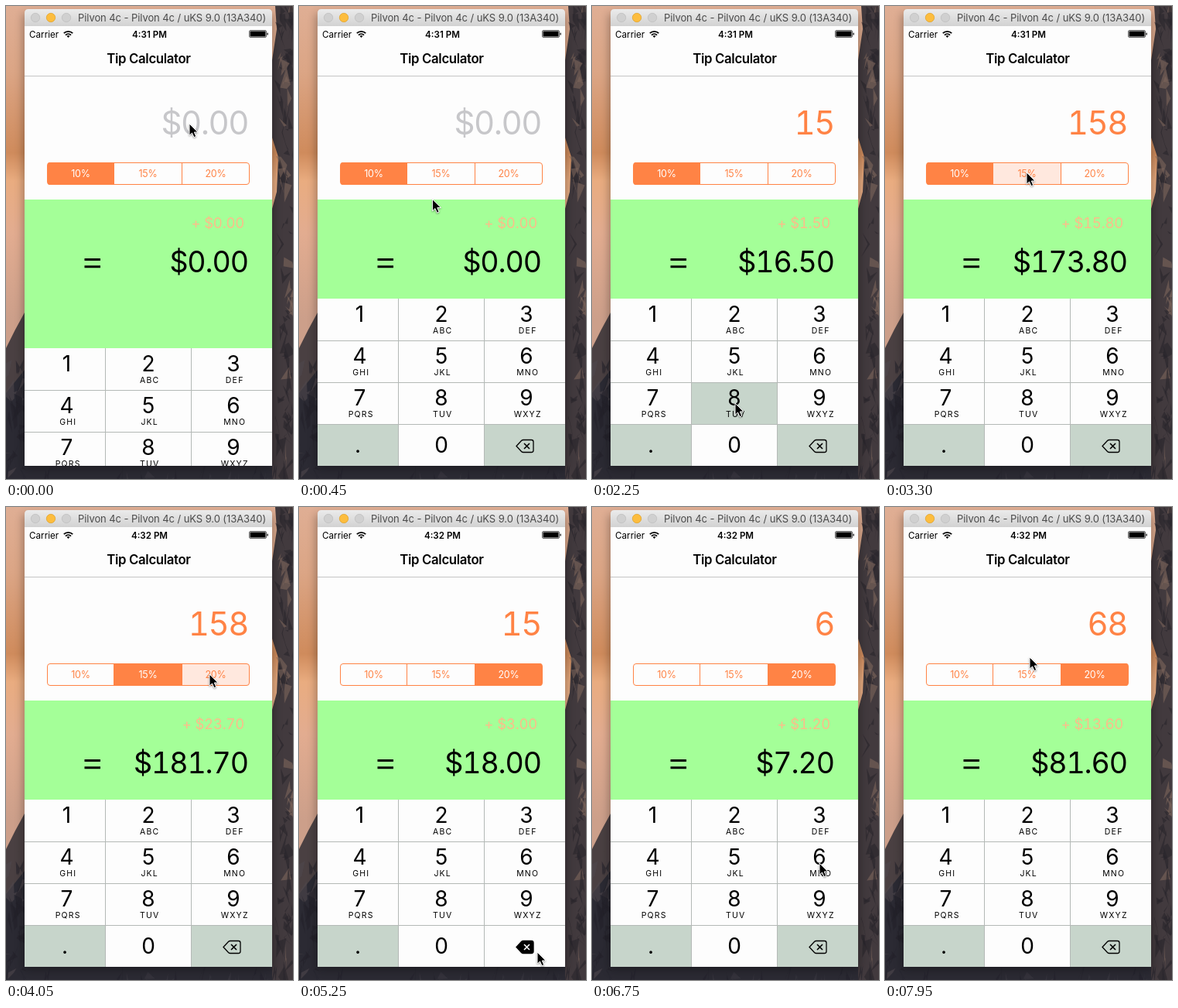
Animation, 371 px wide and 611 px high, one loop 8 s. Source, as an HTML page:

```html
<!DOCTYPE html>
<html lang="en">
<head>
<meta charset="utf-8">
<title>Tip Calculator</title>
<style>
html, body { margin: 0; width: 100%; height: 100%; overflow: hidden; background: #2b2a33; }
svg { display: block; width: 371px; height: 611px; font-family: Inter, Roboto, sans-serif; }
.mid { text-anchor: middle; }
.end { text-anchor: end; font-variant-numeric: tabular-nums; }
.num { font-size: 28px; }
.abc { font-size: 10.5px; letter-spacing: 1.2px; }
</style>
</head>
<body>
<svg viewBox="0 0 371 611">
  <defs>
    <linearGradient id="sky" x2="0" y2="1">
      <stop offset="0" stop-color="#dfae94"/>
      <stop offset=".14" stop-color="#dba585"/>
      <stop offset=".31" stop-color="#cf8b5c"/>
      <stop offset=".37" stop-color="#e9ac80"/>
      <stop offset=".48" stop-color="#e2ac90"/>
      <stop offset=".66" stop-color="#cc9f8a"/>
    </linearGradient>
    <linearGradient id="bar" x2="0" y2="1">
      <stop offset="0" stop-color="#ebebeb"/>
      <stop offset="1" stop-color="#d2d2d2"/>
    </linearGradient>
    <filter id="soft" x="-20%" y="-20%" width="140%" height="140%"><feGaussianBlur stdDeviation="6"/></filter>
    <clipPath id="screen"><rect x="24" y="26" width="320" height="568"/></clipPath>
  </defs>

  <rect width="371" height="611" fill="url(#sky)"/>
  <path d="M0 442L12 418L24 396V440H371V611H0Z" fill="#4a4042"/>
  <path d="M0 500L24 470H371V611H0Z" fill="#2b2a33"/>
  <path d="M371 0H348L350 30L344 70V170L352 195L350 240L344 262V611H371Z" fill="#423a3e"/>
  <g id="rocks"></g>
  <rect x="22" y="10" width="324" height="588" fill="#000" opacity=".3" filter="url(#soft)"/>

  <path d="M24 26V9q0-5 5-5H339q5 0 5 5V26Z" fill="url(#bar)"/>
  <g stroke-width=".7">
    <circle cx="38" cy="15" r="5.7" fill="#d0d0d0" stroke="#bcbcbc"/>
    <circle cx="58" cy="15" r="5.7" fill="#fdbd3e" stroke="#dfa023"/>
    <circle cx="78" cy="15" r="5.7" fill="#d0d0d0" stroke="#bcbcbc"/>
  </g>
  <text x="93" y="20" font-size="13" letter-spacing="-.08" fill="#4b4b4b">Pilvon 4c - Pilvon 4c / uKS 9.0 (13A340)</text>

  <g clip-path="url(#screen)">
    <rect x="24" y="26" width="320" height="568" fill="#fdfdfd"/>
    <text x="30" y="41" font-size="11.7">Carrier</text>
    <g fill="none" stroke="#000" stroke-width="1.8">
      <path d="M74.8 35.2a8 8 0 0 1 11.4 0M77 37.6a5 5 0 0 1 7 0"/>
      <path d="M80.5 41l-2-2.2a3 3 0 0 1 4 0z" fill="#000" stroke="none"/>
    </g>
    <text id="clock" class="mid" x="185.5" y="41" font-size="11.6" font-weight="600"></text>
    <rect x="314.5" y="31.5" width="22" height="9" rx="1.5" fill="none" stroke="#000" stroke-width=".6"/>
    <rect x="315.5" y="32.5" width="20" height="7"/>
    <rect x="337.5" y="34.5" width="1.2" height="3" rx=".6"/>
    <text class="mid" x="184.5" y="74" font-size="16.8" font-weight="600" letter-spacing="-.35">Tip Calculator</text>
    <path d="M24 90.5H344" stroke="#c4c4c4"/>
    <text id="bill" class="end" x="313" y="166" font-size="42" letter-spacing="-1.5"></text>
    <g id="tabs"></g>
    <rect x="24" y="250" width="320" height="344" fill="#a4ff98"/>
    <text id="tip" class="end" x="308" y="286.5" font-size="18.5" letter-spacing="-.2" fill="#fbbd8a"></text>
    <path d="M101.5 327.5H122M101.5 336.8H122" stroke="#000" stroke-width="2.9"/>
    <text id="total" class="end" x="313" y="343.5" font-size="37.5" letter-spacing="-1.1"></text>
    <g id="pad"></g>
  </g>
  <path id="arrow" d="M0 0V15.2L3.5 12L6 17.6L8.7 16.4L6.3 11H11Z" stroke="#fff" style="filter:drop-shadow(0 1px 1px #0006)"/>
</svg>
<script>
const $ = id => document.getElementById(id);
const ORANGE = '#ff8345', GRAY = '#c7d5cb', WHITE = '#fdfdfd';
const STEP = 150, LOOP = 8000;

// Wallpaper facets along both edges and the bottom
let seed = 7;
const rnd = () => (seed = seed * 16807 % 2147483647) / 2147483647;
const facet = (x, y, color) => {
  const p = () => `${x + rnd() * 16 - 8} ${y + rnd() * 40 - 20}`;
  return `<path d="M${p()}L${p()}L${p()}L${p()}Z" fill="${color}" opacity=".6"/>`;
};
let rocks = '';
for (let i = 0; i < 80; i++) {
  const y = rnd() * 611;
  rocks += facet(354 + rnd() * 16, y, rnd() < (y < 430 ? .3 : .08) ? '#7d665c' : '#28252c');
}
for (let i = 0; i < 24; i++) rocks += facet(rnd() * 24, 462 + rnd() * 150, rnd() < .35 ? '#4f484c' : '#23212a');
for (let i = 0; i < 20; i++) rocks += facet(rnd() * 371, 612, rnd() < .4 ? '#3b3941' : '#23222b');
$('rocks').innerHTML = rocks;

// Rate tabs
const edges = [53.5, 139.5, 227.5, 314.5];
$('tabs').innerHTML = '<clipPath id="pill"><rect x="53" y="202" width="262" height="29" rx="4"/></clipPath><g clip-path="url(#pill)">' +
  [10, 15, 20].map((rate, i) => {
    const x = edges[i], w = edges[i + 1] - x;
    return `<rect id="tab${i}" x="${x}" y="202" width="${w}" height="29"/>
      <text id="rate${i}" class="mid" x="${x + w / 2}" y="221" font-size="12.5" letter-spacing="-.2">${rate}%</text>`;
  }).join('') + `</g><path d="M139.5 203V230M227.5 203V230" stroke="${ORANGE}"/>
  <rect x="53.5" y="202.5" width="261" height="28" rx="3.5" fill="none" stroke="${ORANGE}"/>`;

// Number pad
const names = [...'123456789.0', 'del'];
const letters = ['', 'ABC', 'DEF', 'GHI', 'JKL', 'MNO', 'PQRS', 'TUV', 'WXYZ'];
const cols = [24, 128, 239, 344], centers = [78.5, 184, 294];
$('pad').innerHTML = names.map((name, i) => {
  const c = i % 3, y = 378 + 54 * (i / 3 | 0);
  const face = name === 'del'
    ? `<g transform="translate(281 ${y + 20.5})">
       <path id="del" d="M0 8L6.5 1Q7.5 0 9 0H19.5Q22 0 22 2.5V13.5Q22 16 19.5 16H9Q7.5 16 6.5 15Z" stroke="#000" stroke-width="1.3"/>
       <path id="cross" d="M10 4.5l7 7m0-7l-7 7" stroke-width="1.6"/></g>`
    : `<text class="mid num" x="${name === '.' ? 76 : centers[c]}" y="${y + (i > 8 ? 37 : 29.5)}">${name}</text>
       <text class="mid abc" x="${centers[c] + 1.7}" y="${y + 45}">${letters[i] || ''}</text>`;
  return `<rect id="key${name}" x="${cols[c]}" y="${y}" width="${cols[c + 1] - cols[c]}" height="54"/>${face}`;
}).join('') + '<path d="M24 432.5H344M24 486.5H344M24 540.5H344M128.5 378V594M239.5 378V594" stroke="#b4b9b6"/>';

// State changes over time
const start = { bill: '', rate: 0, touch: -1, key: '', clock: '4:31 PM' };
const events = [
  [1200, { bill: '1' }],
  [1800, { key: '5' }], [1950, { key: '', bill: '15' }],
  [2250, { key: '8' }], [2400, { key: '', bill: '158' }],
  [3300, { touch: 1 }], [3450, { touch: -1, rate: 1 }],
  [3600, { clock: '4:32 PM' }],
  [4050, { touch: 2 }], [4350, { touch: -1, rate: 2 }],
  [5250, { key: 'del', bill: '15' }], [5400, { key: '' }],
  [5550, { key: 'del', bill: '1' }], [5700, { key: '' }],
  [5850, { key: 'del', bill: '' }], [6000, { key: '' }],
  [6600, { key: '6' }], [6750, { key: '', bill: '6' }],
  [7200, { key: '8' }], [7350, { key: '', bill: '68' }]
];

// Pointer stops: time, x, y
const stops = [
  [0, 237, 152], [1050, 73, 400], [1200, 78, 405], [1350, 97, 421], [1750, 182, 462], [1950, 184, 464],
  [2100, 185, 513], [2400, 185, 513], [2900, 126, 300], [3300, 183, 215], [3500, 183, 215],
  [3900, 263, 216], [4350, 263, 216], [4800, 346, 450], [5200, 308, 575], [6000, 308, 575],
  [6450, 294, 460], [6750, 294, 460], [7150, 185, 514], [7650, 185, 514], [7800, 174, 370], [7950, 187, 194]
];

function pointer(t) {
  const i = stops.findIndex(s => s[0] >= t);
  if (i < 1) return stops[0].slice(1);
  const [a, b] = [stops[i - 1], stops[i]];
  const p = (t - a[0]) / (b[0] - a[0]), k = p * p * (3 - 2 * p);
  return [1, 2].map(n => a[n] + (b[n] - a[n]) * k);
}

function draw(t) {
  const s = Object.assign({}, start, ...events.filter(e => e[0] <= t).map(e => e[1]));
  const bill = +s.bill, tip = bill * [.1, .15, .2][s.rate];
  $('clock').textContent = s.clock;
  $('bill').textContent = s.bill || '$0.00';
  $('bill').setAttribute('fill', s.bill ? ORANGE : '#c7c7ca');
  $('tip').textContent = '+ $' + tip.toFixed(2);
  $('total').textContent = '$' + (bill + tip).toFixed(2);
  for (let i = 0; i < 3; i++) {
    $('tab' + i).setAttribute('fill', i === s.rate ? ORANGE : i === s.touch ? '#ffe8de' : WHITE);
    $('rate' + i).setAttribute('fill', i === s.rate ? '#fff' : ORANGE);
  }
  for (const name of names) {
    const gray = (name === '.' || name === 'del') !== (name === s.key);
    $('key' + name).setAttribute('fill', gray ? GRAY : WHITE);
  }
  const held = s.key === 'del';
  $('del').setAttribute('fill', held ? '#000' : 'none');
  $('cross').setAttribute('stroke', held ? '#fff' : '#000');
  $('pad').setAttribute('transform', `translate(0 ${Math.round(64 * Math.exp(-t / 80))})`);
  $('arrow').setAttribute('transform', `translate(${pointer(t)})`);
}

const origin = performance.now();
function tick() {
  const t = (performance.now() - origin) % LOOP;
  draw(Math.floor(t / STEP) * STEP);
  requestAnimationFrame(tick);
}
tick();
</script>
</body>
</html>
```
